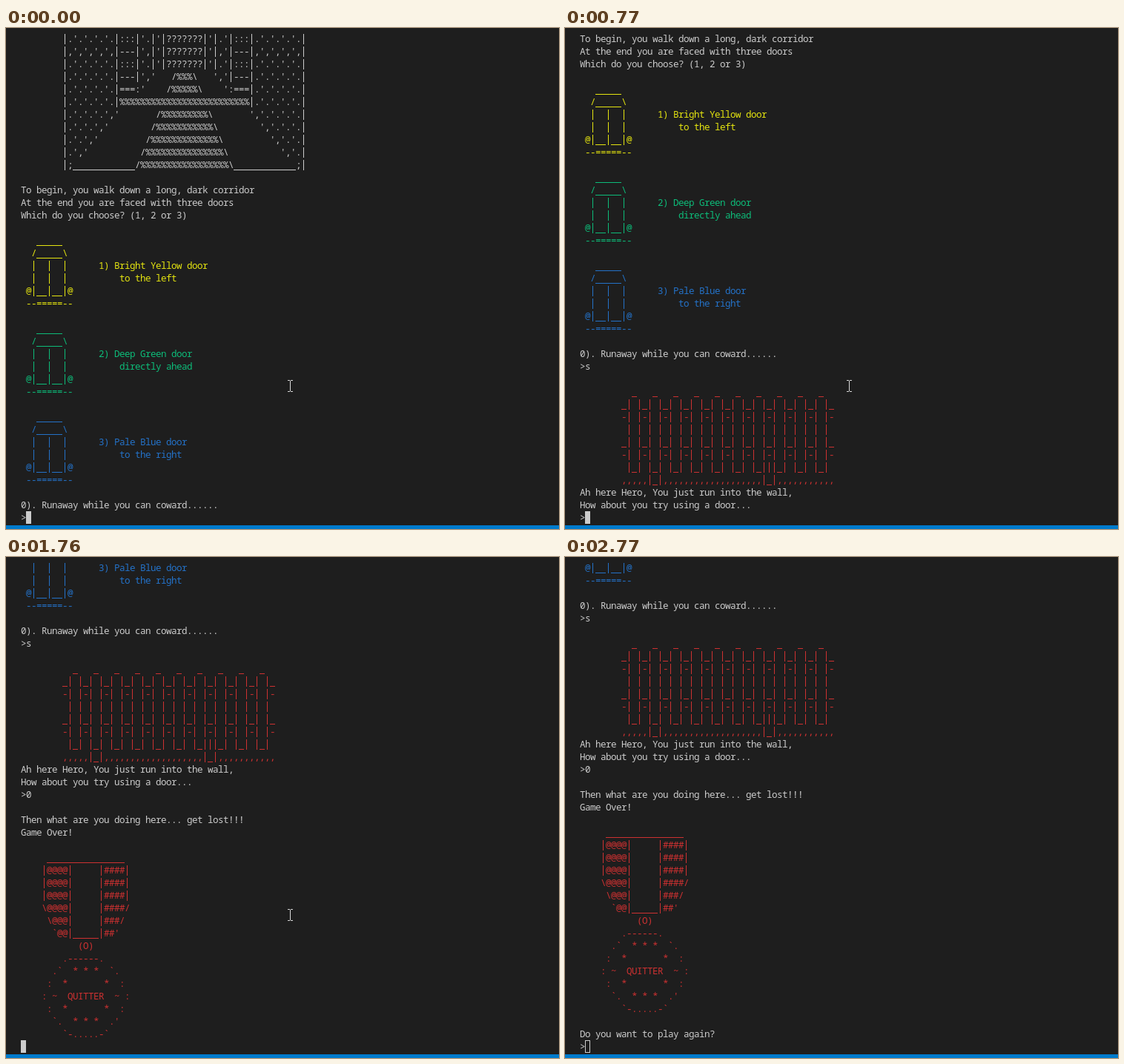
An HTML page with a canvas for the animation above (3.02 s loop, 746 by 676 pixels).

```html
<!DOCTYPE html>
<html lang="en">
<head>
<meta charset="utf-8">
<title>Three doors</title>
<style>
  html, body { margin: 0; width: 100%; height: 100%; overflow: hidden; background: #1e1e1e; }
  canvas { display: block; }
</style>
</head>
<body>
<canvas id="stage" width="746" height="676"></canvas>
<script>
const ctx = document.getElementById("stage").getContext("2d");

const W = 746, H = 676;
const LEFT = 20, TOP = 6, CELL = 7, LINE = 17, ROWS = 39, BASE = 13;
const FONT = '12.6px "Noto Sans Mono", "DejaVu Sans Mono", monospace';
const BACK = "#1e1e1e", BAR = "#007acc";
const WHITE = "#cccccc", YELLOW = "#e5e510", GREEN = "#0dbc79", BLUE = "#2472c8", RED = "#cd3131";

// Terminal buffer: every line ever printed, top to bottom.
const buffer = [];
const print = (color, indent, ...lines) => {
  for (const text of lines) buffer.push({ color, text: " ".repeat(indent) + text });
};
const blank = () => print(WHITE, 0, "");

function printCastle() {
  const dots = "|.'.'.'.'.|";
  const commas = "|,',',',',|";
  const cone = n => "/" + "%".repeat(n) + "\\";
  const bricks = dots + ":::|'.|'|???????|'|.'|:::" + dots;
  print(WHITE, 8,
    bricks,
    commas + "---|',|'|???????|'|,'|---" + commas,
    bricks,
    dots + "---|','   " + cone(3) + "   ','|---" + dots,
    dots + "===:'    " + cone(5) + "    ':===" + dots,
    dots + "%".repeat(25) + dots);
  for (let i = 0; i < 4; i++) {
    const gap = " ".repeat(7 + i);
    const dim = 3 - i;
    print(WHITE, 8,
      "|." + "'.".repeat(dim) + "','" + gap + cone(9 + 2 * i) + gap + "','" + ".'".repeat(dim) + ".|");
  }
  const floor = "_".repeat(12);
  print(WHITE, 8, "|;" + floor + cone(17) + floor + ";|");
}

function printDoor(color, title, place) {
  print(color, 1,
    "  _____",
    " /_____\\",
    " |  |  |      " + title,
    " |  |  |          " + place,
    "@|__|__|@",
    "--=====--");
  blank();
}

function printWall() {
  const course = c => (c + "| |").repeat(10) + c;
  print(RED, 8,
    "  _ ".repeat(10),
    course("_"), course("-"), course(" "), course("_"), course("-"),
    " |_|".repeat(7) + "|" + "|_| ".repeat(3),
    ",".repeat(5) + "|_|" + ",".repeat(19) + "|_|" + ",".repeat(11));
}

function printMedal() {
  const ribbon = "|@@@@|     |####|";
  const stars = ":  *       *  :";
  print(RED, 4,
    " " + "_".repeat(15),
    ribbon, ribbon, ribbon,
    "\\@@@@|     |####/",
    " \\@@@|     |###/",
    "  `@@|_____|##'",
    "       (O)",
    "    .------.",
    "  .`  * * *  `.",
    " " + stars,
    ": ~  QUITTER  ~ :",
    " " + stars,
    "  `.  * * *  .'",
    "    `-.....-`");
}

printCastle();
blank();
print(WHITE, 0,
  "To begin, you walk down a long, dark corridor",
  "At the end you are faced with three doors",
  "Which do you choose? (1, 2 or 3)");
blank();
printDoor(YELLOW, "1) Bright Yellow door", "to the left");
printDoor(GREEN, "2) Deep Green door", "directly ahead");
printDoor(BLUE, "3) Pale Blue door", "to the right");
print(WHITE, 0, "0). Runaway while you can coward......", ">s");
blank();
printWall();
print(WHITE, 0, "Ah here Hero, You just run into the wall,", "How about you try using a door...", ">0");
blank();
print(WHITE, 0, "Then what are you doing here... get lost!!!", "Game Over!");
blank();
printMedal();
blank();
print(WHITE, 0, "Do you want to play again?", ">");

// scroll: first visible line; caret: its column; last: what the bottom row shows.
const REST = [380, 475], AWAY = [542, 487];
const LOOP = 3020;
const steps = [
  { at: 0,    scroll: 0,  caret: 1, last: ">",  mouse: REST },
  { at: 250,  scroll: 1,  caret: 0, last: "",   mouse: REST },
  { at: 770,  scroll: 12, caret: 1, last: ">",  mouse: REST },
  { at: 1520, scroll: 12, caret: 2, last: ">0", mouse: REST },
  { at: 1760, scroll: 32, caret: 0, last: "",   mouse: REST },
  { at: 2020, scroll: 34, caret: 1, last: ">",  mouse: AWAY },
  { at: 2270, scroll: 34, caret: 1, last: ">" },
  { at: 2770, scroll: 34, caret: 1, last: ">",  hollow: true }
];

function drawLine(text, color, row) {
  const y = TOP + row * LINE;
  ctx.fillStyle = color;
  for (let i = 0; i < text.length; i++) {
    const x = LEFT + i * CELL, c = text[i];
    if (c === "_") ctx.fillRect(x, y + 15, CELL, 1);
    else if (c === "|") ctx.fillRect(x + 3, y + 2, 1, 14);
    else if (c !== " ") ctx.fillText(c, x, y + BASE);
  }
}

function drawCaret(col, hollow) {
  const x = LEFT + col * CELL, y = TOP + (ROWS - 1) * LINE;
  ctx.fillStyle = WHITE;
  ctx.fillRect(x, y, CELL, LINE);
  if (hollow) {
    ctx.fillStyle = BACK;
    ctx.fillRect(x + 1, y + 1, CELL - 2, LINE - 2);
  }
}

function drawMouse([x, y]) {
  ctx.fillStyle = "#d8d8d8";
  ctx.fillRect(x + 3, y + 1, 1, 14);
  for (const edge of [y, y + 15]) {
    ctx.fillRect(x, edge, 3, 1);
    ctx.fillRect(x + 4, edge, 3, 1);
  }
}

function draw(t) {
  const step = steps.findLast(s => s.at <= t);
  ctx.fillStyle = BACK;
  ctx.fillRect(0, 0, W, H);
  ctx.font = FONT;
  ctx.textBaseline = "alphabetic";
  for (let row = 0; row < ROWS - 1; row++) {
    const { text, color } = buffer[step.scroll + row];
    drawLine(text, color, row);
  }
  drawLine(step.last, WHITE, ROWS - 1);
  drawCaret(step.caret, step.hollow);
  if (step.mouse) drawMouse(step.mouse);
  ctx.fillStyle = BAR;
  ctx.fillRect(0, 671, W, 5);
}

const start = performance.now();
function tick() {
  draw((performance.now() - start) % LOOP);
  requestAnimationFrame(tick);
}
tick();
</script>
</body>
</html>
```
